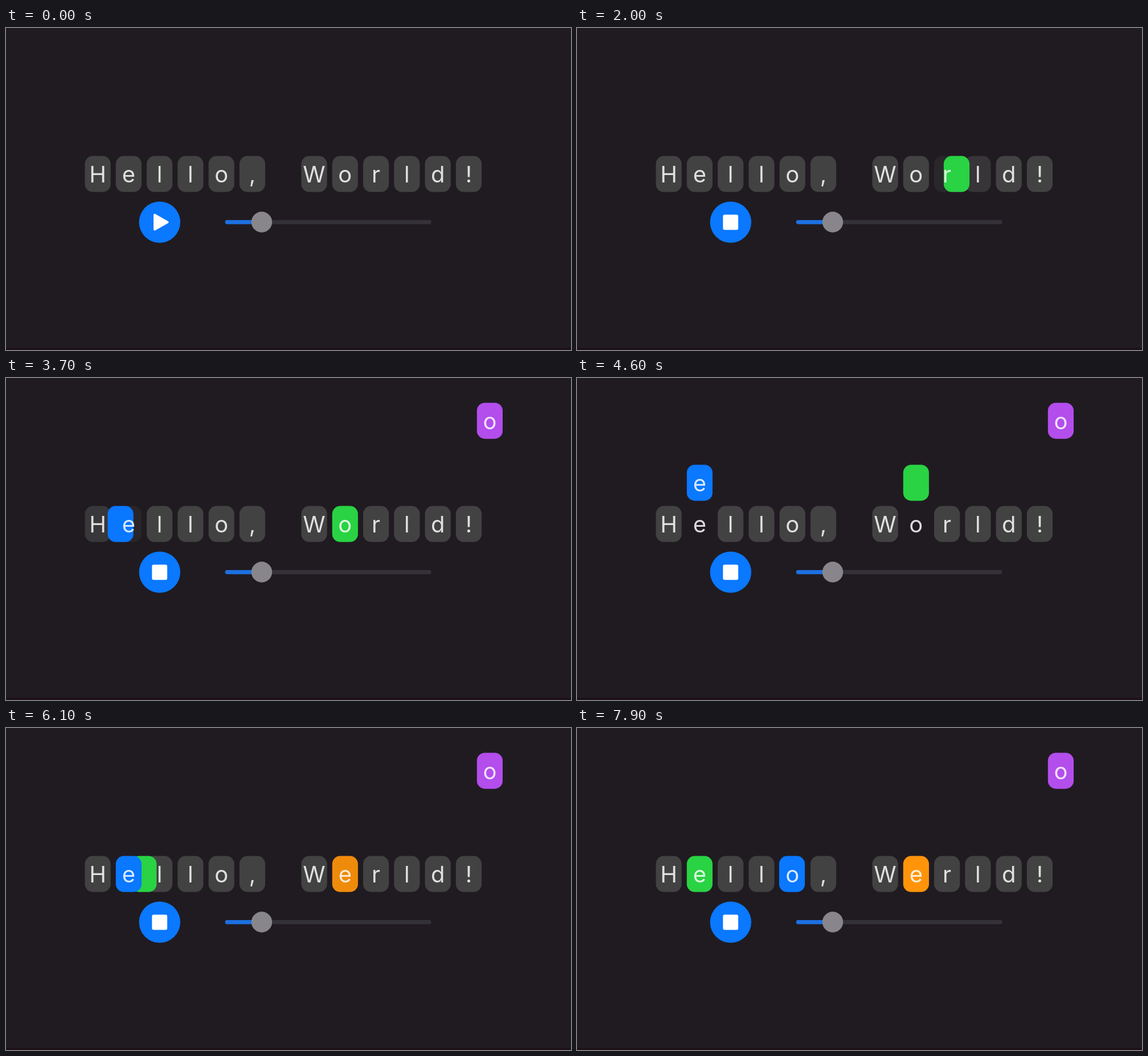
An HTML page with a canvas for the animation above (8 s loop, 992 by 565 pixels).

```html
<!DOCTYPE html>
<html lang="en">
<head>
<meta charset="utf-8">
<title>Rotating vowels</title>
<style>
  html, body { margin: 0; width: 100%; height: 100%; overflow: hidden; background: #201b21; }
  canvas { display: block; }
</style>
</head>
<body>
<canvas id="stage" width="992" height="565"></canvas>
<script>
const ctx = document.getElementById('stage').getContext('2d');
const LOOP = 8000, FRAME = 100, START = 240;
const LEFT = 138.5, TOP = 224.6, PITCH = 54.28, TILE_W = 45.2, TILE_H = 63.2;
const LETTERS = [...'Hello, World!'];
const LIFT = 73, LIFT_AT = 4010, COPY_AT = 4630, DROP_AT = 5170, NEXT_AT = 5720;
const INK = 'rgba(255,255,255,.84)';

// Moves are [time, column]; the first one is where the marker appears.
const markers = [
  { color: '#ff940a', moves: [[NEXT_AT, 8]] },
  { color: '#29d343', moves: [[START, 12], [715, 11], [1255, 10], [1790, 9], [2315, 8], [NEXT_AT, 1]],
    lifts: true, label: 'e', labelAt: COPY_AT },
  { color: '#0a78ff', moves: [[3000, 0], [3470, 1], [6250, 2], [6800, 3], [7350, 4]],
    lifts: true, label: 'e', labelAt: LIFT_AT }
];
const saved = { color: '#b34dec', label: 'o', at: 2880, x: 826.8, y: 43.5 };

// Critically damped spring, 0 to 1.
function spring(ms) {
  if (ms <= 0) return 0;
  const wt = ms / 1000 * 2 * Math.PI / 0.55;
  return 1 - (1 + wt) * Math.exp(-wt);
}

function columnOf(moves, t) {
  return moves.reduce((col, [at, to], i) =>
    i ? col + (to - moves[i - 1][1]) * spring(t - at) : to, 0);
}

function coverage(column, t) {
  let sum = 0;
  for (const { moves } of markers)
    moves.forEach(([at, to], i) => {
      if (to !== column) return;
      sum += spring(t - at);
      if (moves[i + 1]) sum -= spring(t - moves[i + 1][0]);
    });
  return Math.min(1, Math.max(0, sum));
}

function box(x, y, w, h, r, color, alpha = 1) {
  ctx.globalAlpha = alpha;
  ctx.fillStyle = color;
  ctx.beginPath();
  ctx.roundRect(x, y, w, h, r);
  ctx.fill();
  ctx.globalAlpha = 1;
}

function disc(x, y, r, color) {
  box(x - r, y - r, 2 * r, 2 * r, r, color);
}

function tile(x, y, color, alpha) {
  if (alpha > 0) box(x, y, TILE_W, TILE_H, 14, color, alpha);
}

function letter(char, x, y, alpha = 1) {
  if (alpha <= 0) return;
  ctx.globalAlpha = alpha;
  ctx.fillStyle = INK;
  ctx.fillText(char, x + TILE_W / 2, y + 46.4);
  ctx.globalAlpha = 1;
}

function drawControls(t) {
  const playing = spring((t - START) * 2);
  disc(269.8, 340.7, 36.2, '#0a78ff');
  ctx.globalAlpha = 1 - playing;
  ctx.fillStyle = ctx.strokeStyle = '#fff';
  ctx.lineWidth = 4;
  ctx.lineJoin = 'round';
  ctx.beginPath();
  ctx.moveTo(261, 328);
  ctx.lineTo(283.5, 340.7);
  ctx.lineTo(261, 353.4);
  ctx.closePath();
  ctx.fill();
  ctx.stroke();
  box(256.3, 327.4, 26.8, 26.8, 3, '#fff', playing);

  box(384.7, 337, 362, 7.2, 3.6, '#343138');
  box(384.7, 337, 64, 7.2, 3.6, '#1c70e0');
  disc(449, 340.5, 18.2, '#88858b');
}

function drawRow(t) {
  const lift = LIFT * (spring(t - LIFT_AT) - spring(t - DROP_AT));
  const xOf = column => LEFT + PITCH * column;

  LETTERS.forEach((char, i) => {
    if (char !== ' ') tile(xOf(i), TOP, '#424242', 1 - coverage(i, t));
  });
  const placed = markers.map(m => ({
    ...m,
    x: xOf(columnOf(m.moves, t)),
    y: TOP - (m.lifts ? lift : 0),
    alpha: spring(t - m.moves[0][0])
  }));
  for (const m of placed) tile(m.x, m.y, m.color, m.alpha);

  const replaced = spring(t - DROP_AT);
  LETTERS.forEach((char, i) => {
    letter(char, xOf(i), TOP, i === 8 ? 1 - replaced : 1);
  });
  // The carried letter settles into the row as its marker lands.
  if (t >= NEXT_AT) letter('e', xOf(8), TOP);
  for (const m of placed)
    if (m.label && t < NEXT_AT) letter(m.label, m.x, m.y, spring(t - m.labelAt));
}

function draw(t) {
  ctx.fillStyle = '#201b21';
  ctx.fillRect(0, 0, 992, 565);
  ctx.fillStyle = '#1d1217';
  ctx.fillRect(0, 561, 992, 4);
  ctx.font = '40px Inter, sans-serif';
  ctx.textAlign = 'center';

  drawControls(t);
  drawRow(t);
  const shown = spring(t - saved.at);
  tile(saved.x, saved.y, saved.color, shown);
  letter(saved.label, saved.x, saved.y, shown);
}

const begin = performance.now();
function tick() {
  const t = (performance.now() - begin) % LOOP;
  draw(Math.floor(t / FRAME) * FRAME);
  requestAnimationFrame(tick);
}
tick();
</script>
</body>
</html>
```
